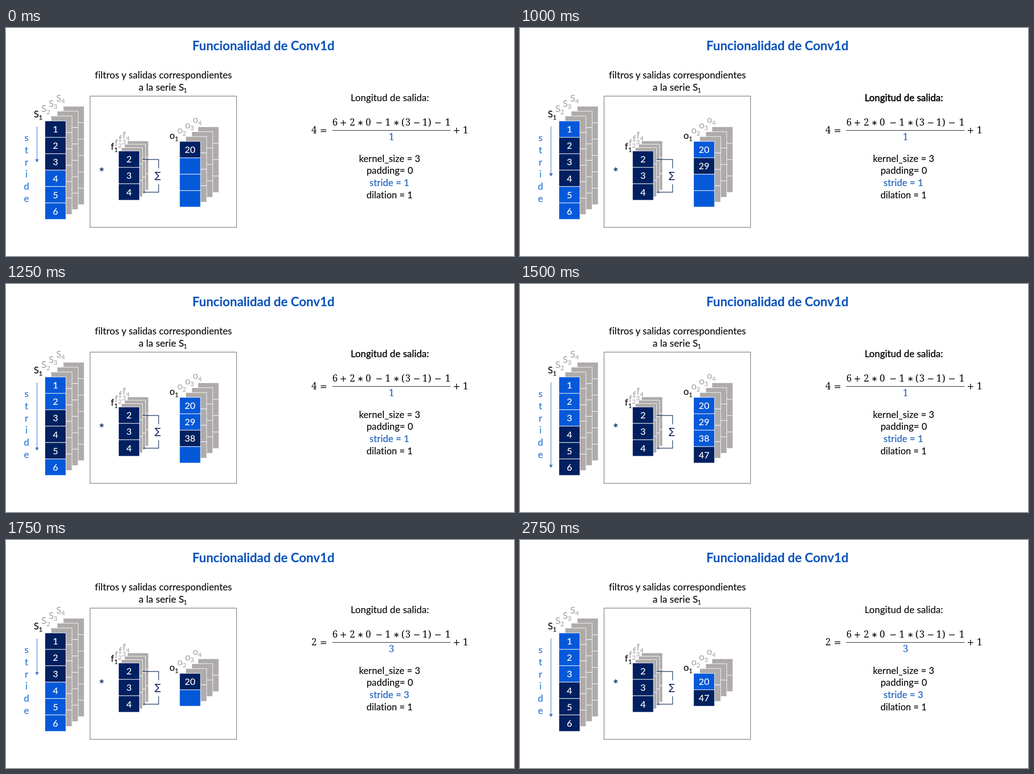
These frames come from a looping animation (1115 by 502 pixels, 3000 ms). An HTML page:

```html
<!DOCTYPE html>
<html lang="es">
<head>
<meta charset="utf-8">
<title>Conv1d</title>
<style>
html, body { margin: 0; width: 100%; height: 100%; overflow: hidden; background: #fff; }
svg { display: block; width: 1115px; height: 502px; font-family: Lato, "Open Sans", sans-serif; }
.body { letter-spacing: .1px; }
.math { font-family: "Noto Serif", serif; letter-spacing: 0; }
.symbol { font-family: "DejaVu Sans", sans-serif; letter-spacing: 0; }
</style>
</head>
<body>
<svg id="stage" viewBox="0 0 1115 502"></svg>
<script>
const NAVY = '#002060', BLUE = '#0559d9', GREY = '#afabab', LABEL = '#a9a9a9', LINK = '#1c5cbc', INK = '#0a0a0a';
const CELL_W = 46, CELL_H = 36.1;
const LOOP = 3000;

// start time, first active input, arrow tip, stride, outputs, number of outputs shown
const STEPS = [
  { at: 0,    first: 0, tip: 296, stride: 1, out: [20, 29, 38, 47], shown: 1, weight: .2 },
  { at: 1000, first: 1, tip: 327, stride: 1, out: [20, 29, 38, 47], shown: 2, weight: .8 },
  { at: 1250, first: 2, tip: 367, stride: 1, out: [20, 29, 38, 47], shown: 3, weight: .5 },
  { at: 1500, first: 3, tip: 405, stride: 1, out: [20, 29, 38, 47], shown: 4, weight: .5 },
  { at: 1750, first: 0, tip: 298, stride: 3, out: [20, 47], shown: 1, weight: .2 },
  { at: 2750, first: 3, tip: 390, stride: 3, out: [20, 47], shown: 2, weight: .2 }
];

const stage = document.getElementById('stage');

function add(parent, tag, attrs, content) {
  const el = document.createElementNS('http://www.w3.org/2000/svg', tag);
  for (const key in attrs) el.setAttribute(key, attrs[key]);
  if (content !== undefined) el.textContent = content;
  return parent.appendChild(el);
}

function text(parent, x, y, str, size = 20, fill = INK, extra = {}) {
  return add(parent, 'text', {
    x, y, 'font-size': size, fill, stroke: fill, 'stroke-width': .2, 'text-anchor': 'middle', ...extra
  }, str);
}

function line(parent, d, stroke, width = 1) {
  return add(parent, 'path', { d, stroke, 'stroke-width': width, fill: 'none' });
}

function column(parent, x, y, fills, values = []) {
  fills.forEach((fill, i) => {
    const top = y + i * CELL_H;
    add(parent, 'rect', { x, y: top, width: CELL_W, height: CELL_H, fill, stroke: '#fff' });
    if (values[i] !== undefined) text(parent, x + CELL_W / 2, top + 25.5, values[i], 20, '#fff');
  });
}

// Front column with three grey copies behind it
function stack(parent, x, y, dx, dy, fills, values) {
  for (let k = 3; k > 0; k--) column(parent, x + k * dx, y - k * dy, fills.map(() => GREY));
  column(parent, x, y, fills, values);
}

function labels(parent, name, x, y, dx, dy, subX) {
  for (let k = 3; k >= 0; k--) {
    const fill = k ? LABEL : INK, lx = x + k * dx, ly = y - k * dy;
    text(parent, lx, ly, name, 20.5, fill, { 'text-anchor': 'start' });
    text(parent, lx + subX, ly + 4.5, k + 1, 14, fill, { 'text-anchor': 'start' });
  }
}

function math(parent, y, tokens, fill = INK) {
  for (const [x, str] of tokens) {
    if (str === '∗') text(parent, x, y - 1, str, 16, fill, { class: 'symbol' });
    else if ('+−='.includes(str)) text(parent, x, y, str, 19.5, fill, { class: 'symbol', 'stroke-width': 0 });
    else text(parent, x, y, str, 21, fill, { class: 'math', 'stroke-width': 0 });
  }
}

function drawFixed() {
  const g = add(stage, 'g', { class: 'body' });
  text(stage, 565, 49, 'Funcionalidad de Conv1d', 27.8, '#0d55be', { 'font-weight': 700 });
  text(g, 345.5, 111, 'filtros y salidas correspondientes', 20.9);
  text(g, 341, 138, 'a la serie S', 21.2);
  text(g, 393.5, 142, '1', 14);
  add(stage, 'rect', { x: 184.5, y: 150, width: 321.5, height: 289, fill: 'none', stroke: '#5b5d66', 'stroke-width': 1.1 });

  [...'stride'].forEach((c, i) => text(stage, 45, 249 + i * 26.8, c, 20.5, '#2a76d8'));
  labels(stage, 'S', 61, 197, 16.4, 11.7, 11);

  text(stage, 210, 329, '*', 28, NAVY);
  stack(stage, 247, 270.8, 6.6, 7.4, [NAVY, NAVY, NAVY], [2, 3, 4]);
  labels(stage, 'f', 230, 268, 8.6, 8.3, 7.5);
  line(stage, 'M300 289.5H335V309M301 361.5H335V344', '#1f3864', 1.4);
  text(stage, 333, 331, '∑', 20, NAVY, { class: 'symbol', 'stroke-width': 0 });

  math(stage, 215, [[722, '6'], [740.5, '+'], [760, '2'], [778, '∗'], [795, '0'], [819, '−'], [838, '1'],
    [857, '∗'], [871.5, '('], [882, '3'], [901.5, '−'], [919.5, '1'], [930, ')'], [948, '−'], [969.5, '1']]);
  line(stage, 'M716 225.5H976', INK, 1.2);
  math(stage, 232, [[697, '='], [989, '+'], [1008.5, '1']]);

  text(g, 842, 295, 'kernel_size = 3', 20.6);
  text(g, 842.5, 321, 'padding= 0', 20.6);
  text(g, 842, 375, 'dilation = 1', 20.4);
}

function drawStep(g, { first, tip, stride, out, shown, weight }) {
  g.replaceChildren();
  const inputs = [1, 2, 3, 4, 5, 6];
  stack(g, 85.5, 204.7, 13.4, 10.8, inputs.map((_, i) => i >= first && i < first + 3 ? NAVY : BLUE), inputs);

  line(g, `M68 217V${tip - 5}`, '#4472c4', 1.2);
  add(g, 'path', { d: `M64 ${tip - 7}h8l-4 7z`, fill: '#4472c4' });

  const top = out.length === 4 ? 250 : 294;
  stack(g, 381, top - .3, 13.4, 10.7, out.map((_, i) => i === shown - 1 ? NAVY : BLUE), out.slice(0, shown));
  labels(g, 'o', 359, top - 6, 17, 11.6, 11.5);

  text(g, 842.5, 161, 'Longitud de salida:', 20.9, INK, { 'stroke-width': weight });
  math(g, 232, [[676, out.length]]);
  math(g, 247, [[846, stride]], LINK);
  text(g, 841.5, 348, `stride = ${stride}`, 20.7, LINK);
}

drawFixed();
const live = add(stage, 'g', { class: 'body' });
let current;

function tick() {
  const t = performance.now() % LOOP;
  const step = STEPS.findLast(s => s.at <= t);
  if (step !== current) drawStep(live, current = step);
  requestAnimationFrame(tick);
}
tick();
</script>
</body>
</html>
```
